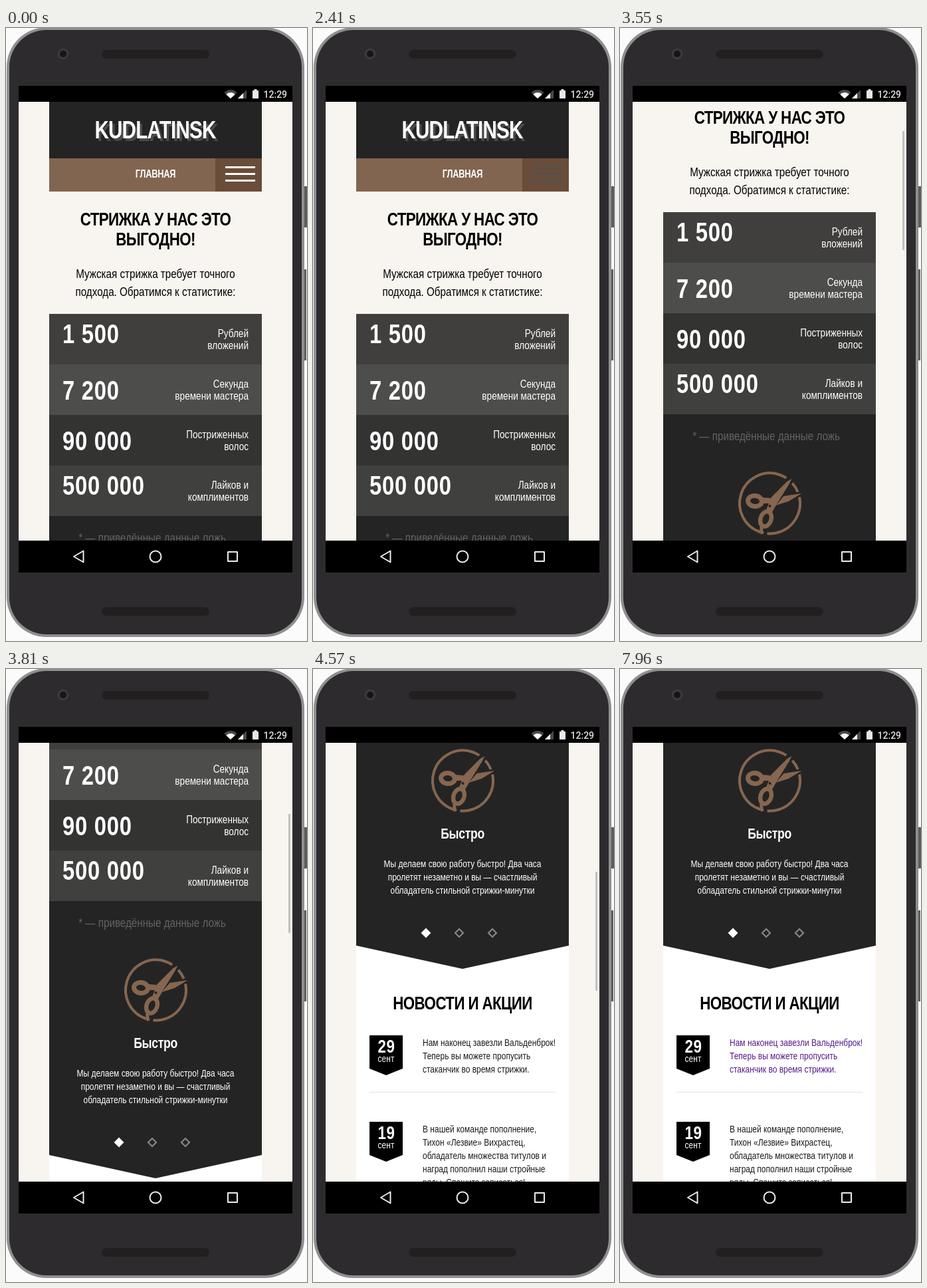
An HTML page with a canvas for the animation above (8000 ms loop, 453 by 922 pixels).

```html
<!DOCTYPE html>
<html lang="ru">
<head>
<meta charset="utf-8">
<title>Барбершоп</title>
<style>
  html, body { margin: 0; width: 100%; height: 100%; overflow: hidden; background: #fbfbfb; }
  canvas { display: block; }
</style>
</head>
<body>
<canvas id="stage" width="453" height="922"></canvas>
<script>
const ctx = document.getElementById('stage').getContext('2d');
const LOOP = 8000;
const NARROW = 0.8; // one condensed cut shared by all page text
const DARK = '#242424', BROWN = '#826550', BRONZE = '#86664f', CREAM = '#f8f5f0';

// weight, size, tracking
const STYLE = {
  logo: ['bold', 37, -1], nav: ['bold', 16, -0.3], head: ['bold', 28, -0.8],
  num: ['bold', 41, 0.9], title: ['bold', 22, -0.4], day: ['bold', 28, 0.8],
  lead: ['normal', 19, 0], label: ['normal', 17, 0], body: ['normal', 15, 0]
};

const SLIDES = [
  ['Быстро', 'Мы делаем свою работу быстро! Два часа',
    'пролетят незаметно и вы — счастливый', 'обладатель стильной стрижки-минутки'],
  ['Круто', 'Забудьте, как вы стриглись раньше. Мы',
    'сделаем из вас звезду футбола или кино!', 'Во всяком случае внешне.'],
  ['Дорого', 'Наши мастера — профессионалы своего',
    'делаи не могут стоить дёшево. К тому же,', 'разве цена не даёт определённый статус?']
];
const STATS = [
  ['1 500', 474, '#403f3e', 'Рублей', 'вложений'],
  ['7 200', 559, '#4d4d4c', 'Секунда', 'времени мастера'],
  ['90 000', 635, '#333332', 'Постриженных', 'волос'],
  ['500 000', 702, '#40403f', 'Лайков и', 'комплиментов']
];
const NEWS = [
  ['29', 'Нам наконец завезли Вальденброк!', 'Теперь вы можете пропусить', 'стаканчик во время стрижки.'],
  ['19', 'В нашей команде пополнение,', 'Тихон «Лезвие» Вихрастец,', 'обладатель множества титулов и',
    'наград пополнил наши стройные', 'ряды. Спешите записаться!']
];
const MENU = ['НОВОСТИ', 'ПРАЙС-ЛИСТ', 'МАГАЗИН', 'КОНТАКТЫ'];

// [time, value] keys, held until the next key
const SCROLL = [[0, 0], [3400, 12], [3470, 75], [3550, 153], [3620, 225], [3680, 290], [3740, 345],
  [3810, 385], [3860, 400], [4310, 430], [4370, 505], [4440, 595], [4500, 662], [4570, 700]];
const BAR = [[0, 0], [3400, 1], [4160, 0.8], [4310, 1], [4860, 0.8], [5010, 0.4], [5160, 0]];
const SLIDE = [[0, 0], [5400, 1], [6260, 2], [7300, 0]];
const LINK = [[0, '#1a1a1a'], [7890, '#38165a'], [7960, '#551a8b']];
const TOGGLE = [[0, 'idle'], [1120, 'pressed'], [1180, 'open'], [2410, 'pressed'], [2610, 'idle']];

function at(keys, t) {
  let value = keys[0][1];
  for (const [time, v] of keys) if (t >= time) value = v;
  return value;
}

function rect(x, y, w, h, color) {
  ctx.fillStyle = color;
  ctx.fillRect(x, y, w, h);
}

function pill(x, y, w, h, r, color) {
  ctx.fillStyle = color;
  ctx.beginPath();
  ctx.roundRect(x, y, w, h, r);
  ctx.fill();
}

function trace(points) {
  ctx.beginPath();
  points.forEach(([x, y]) => ctx.lineTo(x, y));
  ctx.closePath();
}

function poly(points, color) {
  ctx.fillStyle = color;
  trace(points);
  ctx.fill();
}

function disc(x, y, r, color) {
  ctx.fillStyle = color;
  ctx.beginPath();
  ctx.arc(x, y, r, 0, 7);
  ctx.fill();
}

function ring(x, y, rx, ry, turn, width) {
  ctx.lineWidth = width;
  ctx.beginPath();
  ctx.ellipse(x, y, rx, ry, turn, 0, 7);
  ctx.stroke();
}

function arc(r, from, to) {
  ctx.beginPath();
  ctx.arc(0, 0, r, from * Math.PI / 180, to * Math.PI / 180);
  ctx.stroke();
}

function text(str, x, y, style, color, align = 'center') {
  const [weight, size, tracking] = STYLE[style];
  ctx.save();
  ctx.translate(x, y);
  ctx.scale(NARROW, 1);
  ctx.font = `${weight} ${size}px "Liberation Sans", Arial, sans-serif`;
  ctx.letterSpacing = tracking + 'px';
  ctx.textAlign = align;
  ctx.fillStyle = color;
  ctx.fillText(str, 0, 0);
  ctx.restore();
}

function scissors() {
  arc(45.5, -12, 95);
  arc(45.5, -42, -22);
  arc(45.5, 108, 303);
  ring(-22.5, -3.5, 10.5, 8, 0.1, 7);
  ring(-6, 23.5, 8, 11.5, 0.35, 6.5);
  ctx.lineWidth = 5;
  ctx.beginPath();
  ctx.moveTo(-12, 34);
  ctx.quadraticCurveTo(-14, 39, -11, 46);
  ctx.stroke();
  poly([[33, -37], [26, -33], [2, -9], [-6, 11], [3, 14], [11, 0], [29, -29]], BRONZE);
  poly([[48, -15], [21, -11], [9, 3], [28, -3]], BRONZE);
  poly([[-13, -9], [1, -8], [1, 0], [-13, 0]], BRONZE);
  disc(0, 4, 2, DARK);
}

function razor() {
  arc(45.5, 0, 360);
  poly([[-29, 6], [20, -26], [27, -15], [-22, 17]], BRONZE);
  poly([[-27, 16], [-20, 11], [16, 25], [13, 32]], BRONZE);
  disc(-22, 13, 2.5, DARK);
}

function pole() {
  arc(45.5, 128, 412);
  disc(0, -30, 9.5, BRONZE);
  pill(-23.5, -21, 47, 10, 2, BRONZE);
  pill(-23.5, 34, 47, 10, 2, BRONZE);
  rect(-20, -11, 5, 45, BRONZE);
  rect(15, -11, 5, 45, BRONZE);
  ctx.save();
  ctx.beginPath();
  ctx.rect(-12, -11, 24, 45);
  ctx.clip();
  for (const y of [-14, 10, 34]) poly([[-12, y + 10], [12, y - 14], [12, y], [-12, y + 24]], BRONZE);
  ctx.restore();
}

const ICONS = [scissors, razor, pole];

function diamond(x, y, active) {
  const r = active ? 7.5 : 6;
  trace([[x, y - r], [x + r, y], [x, y + r], [x - r, y]]);
  if (active) {
    ctx.fillStyle = '#fff';
    ctx.fill();
  } else {
    ctx.strokeStyle = '#858585';
    ctx.lineWidth = 2.2;
    ctx.stroke();
  }
}

function header(toggle) {
  rect(65, 111, 320, 85, DARK);
  text('KUDLATINSK', 228, 170, 'logo', '#4a4a4a');
  text('KUDLATINSK', 224.5, 166, 'logo', '#fff');
  rect(65, 196, 320, 50, BROWN);
  rect(315, 196, 70, 50, '#694c39');
  text('ГЛАВНАЯ', 225, 225, 'nav', '#fff');
  if (toggle === 'open') {
    ctx.strokeStyle = '#fff';
    ctx.lineWidth = 3;
    ctx.beginPath();
    for (const d of [11, -11]) {
      ctx.moveTo(340, 219.5 - d);
      ctx.lineTo(365, 219.5 + d);
    }
    ctx.stroke();
  } else {
    for (const y of [208, 218, 228]) rect(330, y, 45, 3, toggle === 'idle' ? '#fff' : '#555050');
  }
}

function menu() {
  MENU.forEach((item, i) => {
    const y = 246 + i * 50;
    rect(65, y, 320, 50, BROWN);
    rect(65, y, 320, 1, '#6f543f');
    text(item, 225, y + 29, 'nav', '#fff');
  });
}

function stats() {
  text('СТРИЖКА У НАС ЭТО', 225, 297, 'head', '#000');
  text('ВЫГОДНО!', 225, 327, 'head', '#000');
  text('Мужская стрижка требует точного', 225, 376, 'lead', '#000');
  text('подхода. Обратимся к статистике:', 225, 403, 'lead', '#000');
  STATS.forEach(([value, base, color, top, bottom], i) => {
    const y = 430 + i * 76;
    rect(65, y, 320, 76, color);
    text(value, 85, base, 'num', '#fff', 'left');
    text(top, 365, y + 35, 'label', '#fff', 'right');
    text(bottom, 365, y + 53, 'label', '#fff', 'right');
  });
}

function slider(index) {
  const [title, ...lines] = SLIDES[index];
  poly([[65, 734], [385, 734], [385, 1116], [225, 1151], [65, 1116]], DARK);
  text('* — приведённые данные ложь', 220, 773, 'lead', '#636363');
  ctx.save();
  ctx.translate(225.5, 868);
  ctx.strokeStyle = BRONZE;
  ctx.lineWidth = 4;
  ICONS[index]();
  ctx.restore();
  text(title, 225, 955, 'title', '#fff');
  lines.forEach((line, i) => text(line, 225, 998 + i * 20, 'body', '#fff'));
  for (let i = 0; i < 3; i++) diamond(170 + i * 50, 1097, i === index);
}

function news(link) {
  text('НОВОСТИ И АКЦИИ', 225, 1212, 'head', '#000');
  NEWS.forEach(([day, ...lines], i) => {
    const y = 1251 + i * 130;
    poly([[85, y], [135, y], [135, y + 50], [110, y + 60], [85, y + 50]], '#000');
    text(day, 110.5, y + 26, 'day', '#fff');
    text('сент', 110, y + 40, 'body', '#fff');
    lines.forEach((line, k) => text(line, 165, y + 16 + k * 20, 'body', i ? '#1a1a1a' : link, 'left'));
  });
  rect(85, 1336, 280, 1, '#e4e0d5');
}

function page(t) {
  const scroll = at(SCROLL, t), bar = at(BAR, t), toggle = at(TOGGLE, t);
  ctx.save();
  ctx.beginPath();
  ctx.rect(19, 111, 412, 660);
  ctx.clip();
  rect(19, 111, 412, 660, CREAM);
  ctx.translate(0, -scroll);
  rect(65, 1116, 320, 600, '#fff');
  header(toggle);
  stats();
  slider(at(SLIDE, t));
  news(at(LINK, t));
  if (toggle === 'open') menu();
  ctx.translate(0, scroll);
  rect(425, Math.round(113 + scroll * 0.274), 3, 179, `rgba(128,128,128,${bar * 0.45})`);
  ctx.restore();
}

function statusBar() {
  const fan = (r, color) => {
    ctx.fillStyle = color;
    ctx.beginPath();
    ctx.moveTo(338, 106);
    ctx.arc(338, 106, r, -2.4, -0.74);
    ctx.fill();
  };
  fan(13, '#4a4a4a');
  fan(9, '#fff');
  poly([[349, 106], [362, 106], [362, 93]], '#4a4a4a');
  poly([[349, 106], [357, 106], [357, 98]], '#fff');
  rect(371, 94, 9, 12, '#e8e8e8');
  rect(373.5, 92, 4, 2, '#e8e8e8');
  ctx.font = '500 14px Roboto, sans-serif';
  ctx.textAlign = 'left';
  ctx.fillStyle = '#e0e0e0';
  ctx.fillText('12:29', 387.5, 104.5);
}

function phone() {
  rect(0, 0, 453, 922, '#fbfbfb');
  rect(447, 238, 6, 62, '#5c5c5c');
  rect(447, 363, 5, 137, '#5c5c5c');
  pill(1, -1, 448, 917, 60, '#8f8f8f');
  pill(5, 3, 440, 909, 56, '#2d2b2d');
  disc(86, 39, 8.5, '#3b393b');
  disc(86, 39, 5, '#161516');
  pill(144, 33, 162, 13, 6.5, '#221f21');
  pill(144, 871, 162, 13, 6.5, '#221f21');
  rect(19, 87, 412, 732, '#000');
  statusBar();
  ctx.strokeStyle = '#ececec';
  ctx.lineJoin = 'round';
  ctx.lineWidth = 2;
  trace([[102, 795], [116.5, 786.5], [116.5, 803.5]]);
  ctx.stroke();
  ring(225, 795, 8.5, 8.5, 0, 2);
  ctx.strokeRect(334, 788, 14, 14);
  ctx.lineJoin = 'miter';
}

function draw(now) {
  phone();
  page(now % LOOP);
  requestAnimationFrame(draw);
}
requestAnimationFrame(draw);
</script>
</body>
</html>
```
